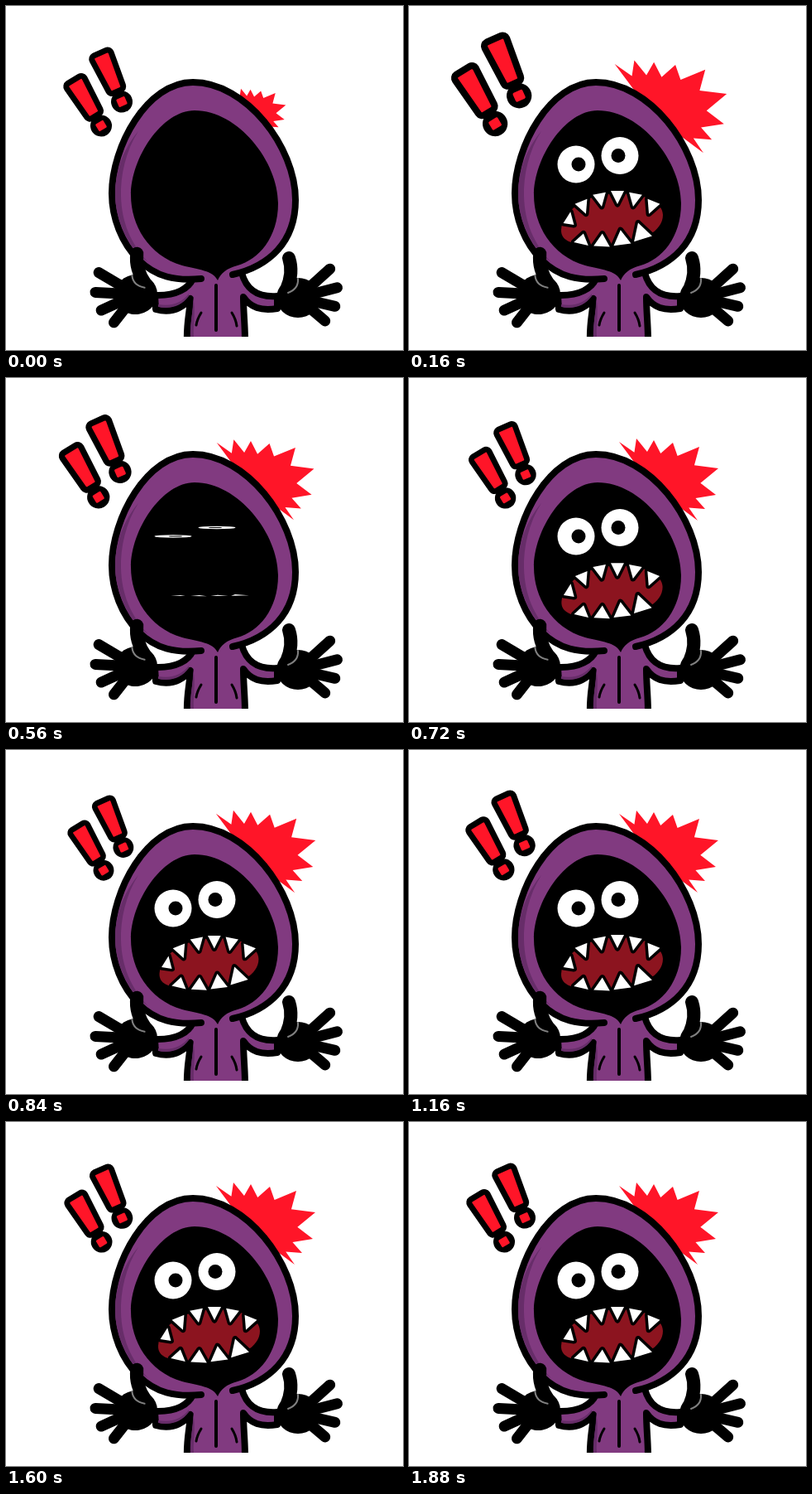
Write an HTML page with a canvas that moves like this. It is 480 px wide and 415 px high and loops after 1.92 s.

```html
<!DOCTYPE html>
<html lang="en">
<head>
<meta charset="utf-8">
<title>Startled hood</title>
<style>
  html, body { margin: 0; width: 100%; height: 100%; overflow: hidden; background: #fff; }
  canvas { display: block; width: 480px; height: 415px; }
</style>
</head>
<body>
<canvas id="stage" width="480" height="415"></canvas>
<script>
const ctx = document.getElementById('stage').getContext('2d');
const LOOP = 1920, STEP = 40;
const PURPLE = '#813a80', SHADE = '#672d69', RED = '#ff1528', MAW = '#8c141f';

// Swings of the exclamation marks as [ms, scale]
const swings = [[0, 1], [200, 1.18], [850, .955], [1180, 1.01], [1600, .991], [1880, 1]];

const smooth = u => (1 - Math.cos(Math.PI * Math.min(1, Math.max(0, u)))) / 2;

function markScale(t) {
  let s = swings[0][1];
  for (let i = 1; i < swings.length; i++) {
    const [t0, a] = swings[i - 1], [t1, b] = swings[i];
    s += (b - a) * smooth((t - t0) / (t1 - t0));
  }
  return s;
}

const burstScale = t => 1 + .55 * Math.exp(-.006 * t) * Math.sin(Math.PI * (t - 95) / 310);

// Pops open, then one blink centred at 565 ms
const faceOpen = t => smooth(t / 160) * (.07 + .93 * smooth(Math.abs(t - 565) / 145));

const mouthSwell = t => 1 - .025 * Math.exp(-(((t - 840) / 100) ** 2));

function shape(path, fill, stroke, width) {
  const p = new Path2D(path);
  if (fill) { ctx.fillStyle = fill; ctx.fill(p); }
  if (stroke) { ctx.strokeStyle = stroke; ctx.lineWidth = width; ctx.stroke(p); }
}

function oval(x, y, rx, ry, fill) {
  ctx.fillStyle = fill;
  ctx.beginPath();
  ctx.ellipse(x, y, rx, ry, 0, 0, Math.PI * 2);
  ctx.fill();
}

function placed(x, y, turn, sx, sy, draw) {
  ctx.save();
  ctx.translate(x, y);
  ctx.rotate(turn);
  ctx.scale(sx, sy);
  draw();
  ctx.restore();
}

// Spike tips around the burst centre; each notch is pulled inwards between two tips
const tips = [[-41, -55], [-20, -59], [1, -57], [24, -54], [56, -49], [79, -23], [76, 9], [63, 26], [54, 40]];

function drawBurst() {
  let path = 'M0 0';
  tips.forEach(([x, y], i) => {
    path += `L${x} ${y}`;
    const next = tips[i + 1];
    if (next) path += `L${(x + next[0]) * .37} ${(y + next[1]) * .37}`;
  });
  shape(path + 'Z', RED);
}

function drawMark(ink) {
  const bar = 'M-5 -18 L-8 -60 H8 L5 -18Z', dot = 'M-4 -3.5 H4 V3.5 H-4Z';
  if (ink === RED) {
    shape(bar, RED, RED, 2);
    shape(dot, RED, RED, 3);
  } else {
    shape(bar, ink, ink, 16);
    oval(0, 0, 13, 13, ink);
  }
}

function drawMarks() {
  for (const ink of ['#000', RED]) {
    placed(-67, -15.5, -.54, 1, 1, () => drawMark(ink));
    placed(-42, -44.5, -.42, 1, 1, () => drawMark(ink));
  }
}

function drawBody() {
  ctx.save();
  ctx.beginPath();
  ctx.rect(0, 0, 480, 399);
  ctx.clip();
  shape('M226 329 C221 340 207 350 180 349 L181 366 C200 371 213 365 223 353 ' +
    'C222 370 218 384 219 404 H289 C289 384 287 370 287 351 C296 364 308 368 328 365 ' +
    'L328 350 C302 352 290 340 285 322', PURPLE, '#000', 8);
  shape('M184 360 C202 363 213 357 221 347 V350 C212 362 200 366 184 363Z', SHADE);
  shape('M226 350 C227 368 222 383 223 399 H227 C226 383 230 370 226 350Z', SHADE);
  ctx.restore();
  shape('M254 337 V391', null, '#000', 4);
  shape('M236 370 Q231 378 230 385 M273 370 Q278 378 279 386', null, '#000', 3);
}

function drawHood() {
  shape('M236 329 C205 332 181 327 160 306 C140 286 128 256 128 226 C128 170 170 92 226 92 ' +
    'C290 92 350 170 350 234 C350 285 318 314 274 324', PURPLE, '#000', 8);
  shape('M160 151 C145 174 138 205 139 230 C140 260 150 286 172 309 ' +
    'C146 292 132 254 132 228 C132 197 143 171 160 151Z', SHADE);
  shape('M256 331 C250 319 233 318 213 313 C172 301 151 264 151 228 C151 184 188 126 228 126 ' +
    'C281 126 329 188 329 238 C329 280 305 306 280 313 C266 317 260 322 256 331Z', '#000');
}

function drawHand() {
  shape('M-11 -48 Q-5 -30 -14 -10', null, '#000', 16);
  for (let i = 0; i < 4; i++) {
    const a = (-42 + 27.5 * i) * Math.PI / 180, r = 52 - 3 * i;
    shape(`M0 0 L${r * Math.cos(a)} ${r * Math.sin(a)}`, null, '#000', 13);
  }
  oval(0, 0, 26, 24, '#000');
  shape('M0 -23 Q1 -11 -12 -6', null, '#808080', 2);
}

function tooth(x, y, half, height, turn) {
  const path = `M${-half} 0 L0 ${height} ${half} 0Z`;
  placed(x, y, turn, 1, 1, () => {
    shape(path, null, '#000', 7);
    shape(path, '#fff');
  });
}

// Coordinates run from the middle of the mouth
function drawMouth(shut) {
  if (!shut) {
    shape('M-61 9 C-59 -15 -30 -34 5 -35 C40 -36 62 -24 62 -9 ' +
      'C62 10 38 25 0 26 C-30 28 -62 29 -61 9Z', MAW);
    for (let i = -2; i <= 2; i++) tooth(7 + 22 * i, -38 + 3.2 * i * i, 8, 16, .19 * i);
    tooth(-52, 2, 6.5, -15, .15);
  }
  for (let i = 0; i < 4; i++) {
    const x = -37 + 25 * i;
    tooth(x, 29 - .004 * (x + 10) ** 2, 9 + .8 * i, -13 - 2.4 * i, -.007 * (x + 5));
  }
}

function drawFace(t) {
  const open = faceOpen(t), swell = mouthSwell(t);
  if (open < .01) return;
  for (const [x, y, look] of [[202, 191, 3], [255, 180.5, -2]]) {
    placed(x, y, 0, 1, open, () => {
      oval(0, 0, 22.5, 22.5, '#fff');
      oval(look, 0, 8.5, 8.5, '#000');
    });
  }
  placed(245, 261, 0, swell, open * swell, () => drawMouth(open < .12));
}

function draw(t) {
  ctx.fillStyle = '#fff';
  ctx.fillRect(0, 0, 480, 415);
  ctx.lineCap = ctx.lineJoin = 'round';
  const b = burstScale(t), m = markScale(t);
  placed(295, 132, 0, b, b, drawBurst);
  placed(182, 160, 0, m, m, drawMarks);
  drawBody();
  drawHood();
  drawFace(t);
  placed(353, 352, 0, 1, 1, drawHand);
  placed(157, 348, -.2, -1, 1, drawHand);
}

const start = performance.now();
function tick() {
  const t = (performance.now() - start) % LOOP;
  draw(Math.floor(t / STEP) * STEP);
  requestAnimationFrame(tick);
}
tick();
</script>
</body>
</html>
```
